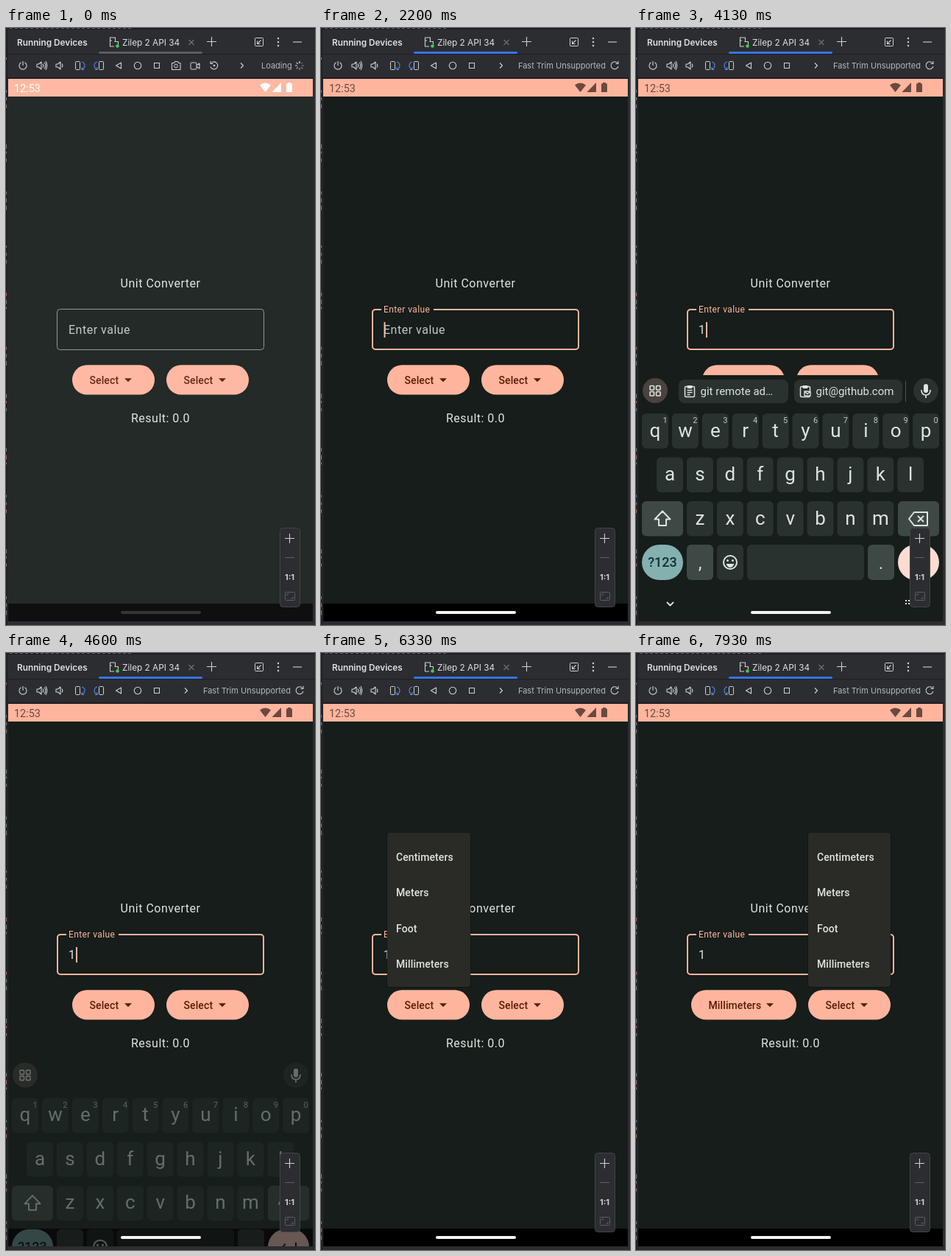
An HTML page that plays this animation: 420x810 px, repeating every 8 s.

```html
<!DOCTYPE html>
<html lang="en">
<head>
<meta charset="utf-8">
<title>Unit converter in a device emulator</title>
<style>
html, body { margin: 0; width: 100%; height: 100%; overflow: hidden; background: #2b2d30; }
svg { display: block; width: 100%; height: 100%; }
text { font-family: Roboto, sans-serif; white-space: pre; }
.ide { font-family: Inter, sans-serif; }
.body { font-size: 16px; letter-spacing: .5px; }
.btn { font-size: 14px; font-weight: 500; letter-spacing: .1px; }
</style>
</head>
<body>
<svg id="stage" viewBox="0 0 420 810"></svg>
<script>
const LOOP = 8000, STEP = 200 / 3;
const BG = '#161d1a', PEACH = '#ffb59d', RUST = '#5b1b07', INK = '#dee4e0', ICON = '#ced0d6';
const KEY = '#29322f', KEY2 = '#3e4845';

const clamp = v => Math.max(0, Math.min(1, v));
const ramp = (t, from, to) => clamp((t - from) / (to - from));
const mix = (a, b, p) => `rgb(${a.map((v, i) => Math.round(v + (b[i] - v) * p))})`;

const rect = (x, y, w, h, fill, r = 0, more = '') =>
  `<rect x="${x}" y="${y}" width="${w}" height="${h}" rx="${r}" fill="${fill}" ${more}/>`;
const box = (x, y, w, h, color, r = 0, width = 1) =>
  rect(x, y, w, h, 'none', r, `stroke="${color}" stroke-width="${width}"`);
const disc = (x, y, r, fill, more = '') => `<circle cx="${x}" cy="${y}" r="${r}" fill="${fill}" ${more}/>`;
const line = (d, color = ICON, width = 1.1) =>
  `<path d="${d}" fill="none" stroke="${color}" stroke-width="${width}" stroke-linejoin="round"/>`;
const shape = (d, fill) => `<path d="${d}" fill="${fill}"/>`;
const text = (x, y, s, fill, more = '') => `<text x="${x}" y="${y}" fill="${fill}" ${more}>${s}</text>`;
const mid = 'text-anchor="middle"';

function frame() {
  let s = rect(0, 0, 420, 810, '#2b2d30') + rect(0, 0, 420, 2, '#1e1f22') + rect(0, 0, 2, 810, '#1e1f22');
  for (let i = 0; i < 34; i++) {
    const y = 40 + (i * 137.3) % 760;
    s += rect(0, y, 1, 3 + i % 4, i % 5 ? '#777b80' : '#b5655c');
  }
  for (let x = 5; x < 170; x += 7) s += rect(x, 0, 4, 1, '#5d6167');
  s += rect(2, 35, 418, 1, '#1e1f22') + rect(2, 67, 416, 2, '#1e1f22');
  s += text(15, 24, 'Running Devices', '#dfe1e5', 'class="ide" font-size="11.8" font-weight="600"');
  s += text(158, 24, 'Zilep 2 API 34', '#dfe1e5', 'class="ide" font-size="11.8"');
  s += line('M147 25h-5.5v-12h7v5M141 17h3M147.5 18.5h5v4') + disc(151.5, 24.5, 2.3, '#3fd04a');
  s += line('M248.5 16l7 7m0-7l-7 7', '#6f737a') + line('M273 18.5h13M279.5 12v13');
  s += box(338.5, 13.5, 11, 11, ICON, 1) + line('M346.5 16.5l-5 5m0-4v4h4');
  s += [14, 19, 24].map(y => disc(370, y, 1.2, ICON)).join('') + line('M390 19h12');
  return s;
}

function toolbar(t) {
  const loading = t < 540, blue = '#548af7';
  const speaker = x => line(`M${x} 49h2.5l3.5-3v10l-3.5-3h-2.5zM${x + 8} 48.5q1.8 2.5 0 5`);
  let s = rect(126, 32, 141, 3, t < 1530 ? '#5a5d63' : '#3574f0', 1.5);
  s += line('M20.5 46.8a5 5 0 1 0 5 0M23 45v6') + speaker(42) + line('M52 46.5q3.6 4.5 0 9M54 45q3.4 6 0 12') + speaker(68);
  s += box(94.5, 45.5, 6, 11, ICON, 1) + line('M103 46q4 1 4 5t-4 5m0-3v3.5h3', blue);
  s += box(126.5, 45.5, 6, 11, ICON, 1) + line('M124 46q-4 1-4 5t4 5m0-3v3.5h-3', blue);
  s += line('M156.5 47v8l-7-4z') + disc(179, 51, 4.7, 'none', `stroke="${ICON}" stroke-width="1.1"`);
  s += box(201.5, 47.5, 7, 7, ICON);
  if (loading) {
    s += line('M225.5 47.5h3l1-2h4l1 2h2.500v9h-11.500z') + disc(231, 51.5, 2.4, 'none', `stroke="${ICON}"`);
    s += box(251, 47, 8, 9, ICON, 1) + line('M259 50.500l4-2.500v7l-4-2.500');
    s += line('M279 47.500a5 5 0 1 1-1 5M278 45v3.500h3.500') + disc(283, 51, 1.3, ICON);
    s += line('M319 47.500l3.500 3.500l-3.500 3.500');
    s += text(347, 55, 'Loading', '#b4b8bf', 'class="ide" font-size="11"');
    const turn = Math.round(t / STEP);
    for (let i = 0; i < 8; i++)
      s += `<path d="M399 48v-3" stroke="${ICON}" stroke-width="1.4" opacity="${1 - ((turn - i + 80) % 8) * .1}" transform="rotate(${i * 45} 399 51)"/>`;
  } else {
    s += line('M243 47.500l3.500 3.500l-3.500 3.500');
    s += text(387, 55, 'Fast Trim Unsupported', '#b4b8bf', 'class="ide" font-size="11" text-anchor="end"');
    s += line('M403 47.500a5 5 0 1 0 1 4.500M404 45v3.500h-3.500');
  }
  return s;
}

function statusBar(t) {
  const c = mix([255, 255, 255], [107, 73, 63], ramp(t, 70, 330));
  return rect(3, 69, 414, 24, PEACH) + text(11, 86.5, '12:53', c, 'font-size="14.4"') +
    shape('M345 77.500q7.500-6 15 0l-7.500 9.500z', c) + shape('M374 74v13h-12.500z', c) +
    shape('M383 74h4v1.500h2v11.500h-8v-11.500h2z', c);
}

function cursorOn(t) {
  if (t < 2200 || (t >= 2870 && t < 3130)) return false;
  if (t < 3670) return true;
  return t >= 4130 && (t - 4120) % 1000 < 510;
}

function field(t) {
  const focus = t >= 1870;
  const p = t >= 2200 ? 1 : focus ? Math.min(.75, (t - 1810) / 250) : 0;
  let s = focus ? box(70, 382, 280, 54, PEACH, 4, 2) : box(69.5, 381.5, 281, 55, '#89938f', 4);
  if (focus) s += rect(82, 380, 71 * p, 4, BG);
  s += text(85, 415 - 29 * p, 'Enter value', focus ? PEACH : '#bfc9c4',
    `font-size="${16 - 4 * p}" letter-spacing="${.5 - .1 * p}"`);
  const typed = t >= 3130;
  if (cursorOn(t)) s += rect(typed ? 95 : 85.5, 399, 2, 21, PEACH);
  if (typed) s += text(85, 415, '1', INK, 'class="body"');
  else if (t >= 2200) s += text(85, 415, 'Enter value', '#bfc9c4', 'class="body"');
  return s;
}

// Pressed tint rises quickly and fades out over 800 ms
function button(x, w, label, age) {
  const tint = age < 0 || age >= 800 ? 0 : .14 * ramp(age, -60, 200) * (1 - ramp(age, 350, 800));
  const a = x + w - 36;
  return rect(x, 457.3, w, 40.3, PEACH, 20) + rect(x, 457.3, w, 40.3, RUST, 20, `opacity="${tint}"`) +
    text(x + 23.5, 483, label, RUST, 'class="btn"') + shape(`M${a - 5} 475.300h10l-5 5z`, RUST);
}

function menu(x, w, open, alpha) {
  if (!open || !alpha) return '';
  const names = ['Centimeters', 'Meters', 'Foot', 'Millimeters'];
  const k = .8 + .2 * open;
  return `<g opacity="${open * alpha}" transform="translate(${x} 453) scale(${k}) translate(${-x} -453)">` +
    rect(x - 1, 245, w + 2, 209, '#000', 4, 'opacity=".25"') + rect(x, 244, w, 209, '#2a2a27', 4) +
    names.map((n, i) => text(x + 12, 282 + i * 48.3, n, INK, 'class="btn"')).join('') + '</g>';
}

function keyRow(letters, x0, y, digits) {
  return [...letters].map((ch, i) => {
    const x = x0 + i * 40.9;
    return rect(x - 18, y, 36, 47.500, KEY, 6) + text(x, y + 31.5, ch, INK, `${mid} font-size="26"`) +
      (digits ? text(x + 13.5, y + 13, (i + 1) % 10, '#bfc9c4', `${mid} font-size="11"`) : '');
  }).join('');
}

function chip(x, w, label, mail) {
  const i = x + 15;
  return rect(x, 477, w, 32, KEY, 8) + text(x + 29.5, 498, label, INK, 'font-size="15"') +
    box(i - 6.5, 486.500, 13, 14, INK, 1.5, 1.500) + rect(i - 3.500, 485, 7, 4, INK, 1) +
    (mail ? rect(i - 2, 492, 10, 8, KEY) + line(`M${i - 1} 493h8v6h-8zl4 3.500l4-3.500`, INK, 1.4)
      : line(`M${i - 3.500} 491.500h7m-7 3h7m-7 3h4`, INK, 1.3));
}

function keyboard(t) {
  const p = Math.max(0, (t - 4480) / 250);
  if (t < 2470 || p >= .8) return '';
  let s = rect(3, 471, 414, 420, BG);
  s += disc(26, 492, 17, mix([41, 50, 47], [74, 66, 62], ramp(t, 3070, 3270)));
  for (const x of [19, 27.500]) for (const y of [485.500, 493.500]) s += box(x, y, 5.500, 5.500, INK, 1, 1.6);
  if (t < 4600) s += chip(58, 149, 'git remote ad…') + chip(215, 147, 'git@github.com', true) + rect(366, 479, 1, 28, '#4a524f');
  s += disc(394, 492, 17, KEY) + rect(391, 483, 6, 12, INK, 3) + line('M388 491q0 7 6 7t6-7M394 498v4', INK, 1.7);
  s += keyRow('qwertyuiop', 26, 523, true) + keyRow('asdfghjkl', 46, 582.500) + keyRow('zxcvbnm', 87, 642);
  s += rect(8, 642, 56, 47.500, KEY2, 6) + line('M36 655.500l-10.500 11h5.500v8.500h10v-8.500h5.500z', INK, 2);
  s += rect(356, 642, 56, 47.500, KEY2, 6) + line('M371 666l7-9h18v18h-18zM383 662l8 8m0-8l-8 8', INK, 2);
  s += rect(8, 701, 56, 48, '#84b0b0', 24) + text(36, 731, '?123', '#10302f', `${mid} font-size="18" font-weight="500"`);
  s += rect(69, 701, 36, 48, KEY2, 6) + text(87, 734, ',', INK, `${mid} font-size="24"`);
  s += rect(110, 701, 36, 48, KEY, 6) + disc(128, 725, 9, 'none', `stroke="${INK}" stroke-width="2"`) +
    disc(124.500, 722.500, 1.5, INK) + disc(131.500, 722.500, 1.5, INK) + shape('M122.500 727h11q-2 5-5.500 5t-5.500-5z', INK);
  s += rect(151, 701, 159, 48, KEY, 6) + rect(315, 701, 36, 48, KEY2, 6) + text(333, 734, '.', INK, `${mid} font-size="24"`);
  s += rect(356, 701, 56, 48, '#ffdbd0', 24) + line('M394 719v7h-19m5-5l-5 5l5 5', RUST, 2);
  s += line('M42 779l4.500 4.500l4.500-4.500', INK, 1.8);
  for (const x of [367, 371]) for (const y of [776, 780]) s += rect(x - 1, y, 2, 2, INK);
  return `<g opacity="${1 - 1.25 * p}" transform="translate(0 ${350 * p * p})">${s}</g>`;
}

function zoomPanel() {
  const dim = '#5a5d63';
  return rect(372.500, 678.500, 27, 107, '#2b2d30', 4, 'stroke="#43454a"') + line('M379 692.500h13M385.500 686v13') +
    line('M379 718.500h13', dim) + text(385.500, 749, '1:1', ICON, `class="ide" ${mid} font-size="11" font-weight="700"`) +
    box(379.500, 765.500, 13, 11, dim, 1) + line('M382 770v-2h2.500M390 772v2h-2.500', dim);
}

function device(t) {
  const picked = t >= 6670;
  const level = t < 670 ? 53 + 142 * t / 670 : 195 + 50 * ramp(t, 670, 1270);
  const pill = `rgb(${[level, level, level].map(Math.round)})`;
  let s = rect(3, 69, 414, 736, BG) + statusBar(t);
  s += text(210, 352, 'Unit Converter', INK, `class="body" ${mid}`) + field(t);
  s += picked ? button(75, 143, 'Millimeters', -1) + button(234, 112, 'Select', t - 7130)
    : button(90, 112, 'Select', t - 5530) + button(218, 112, 'Select', -1);
  s += text(210, 535, 'Result: 0.0', INK, `class="body" ${mid}`);
  s += menu(90, 113, ramp(t, 5680, 5830), t < 6670 ? 1 : t < 6730 ? .4 : 0);
  s += menu(234, 112, ramp(t, 7280, 7430), 1);
  s += rect(3, 781, 414, 24, '#000') + keyboard(t);
  s += rect(3, 69, 414, 736, '#fff', 0, `opacity="${.06 * (1 - ramp(t, 0, 470))}"`);
  s += rect(156, 791, 109, 4, pill, 2);
  return `<svg x="3" y="69" width="414" height="736" viewBox="3 69 414 736">${s}</svg>`;
}

const stage = document.getElementById('stage');
const fixed = frame(), panel = zoomPanel();
let shown = -1;

function tick(now) {
  const t = Math.round(Math.floor((now % LOOP + 5) / STEP) * STEP / 10) * 10 % LOOP;
  if (t !== shown) {
    shown = t;
    stage.innerHTML = fixed + toolbar(t) + device(t) + panel;
  }
  requestAnimationFrame(tick);
}
tick(performance.now());
</script>
</body>
</html>
```
